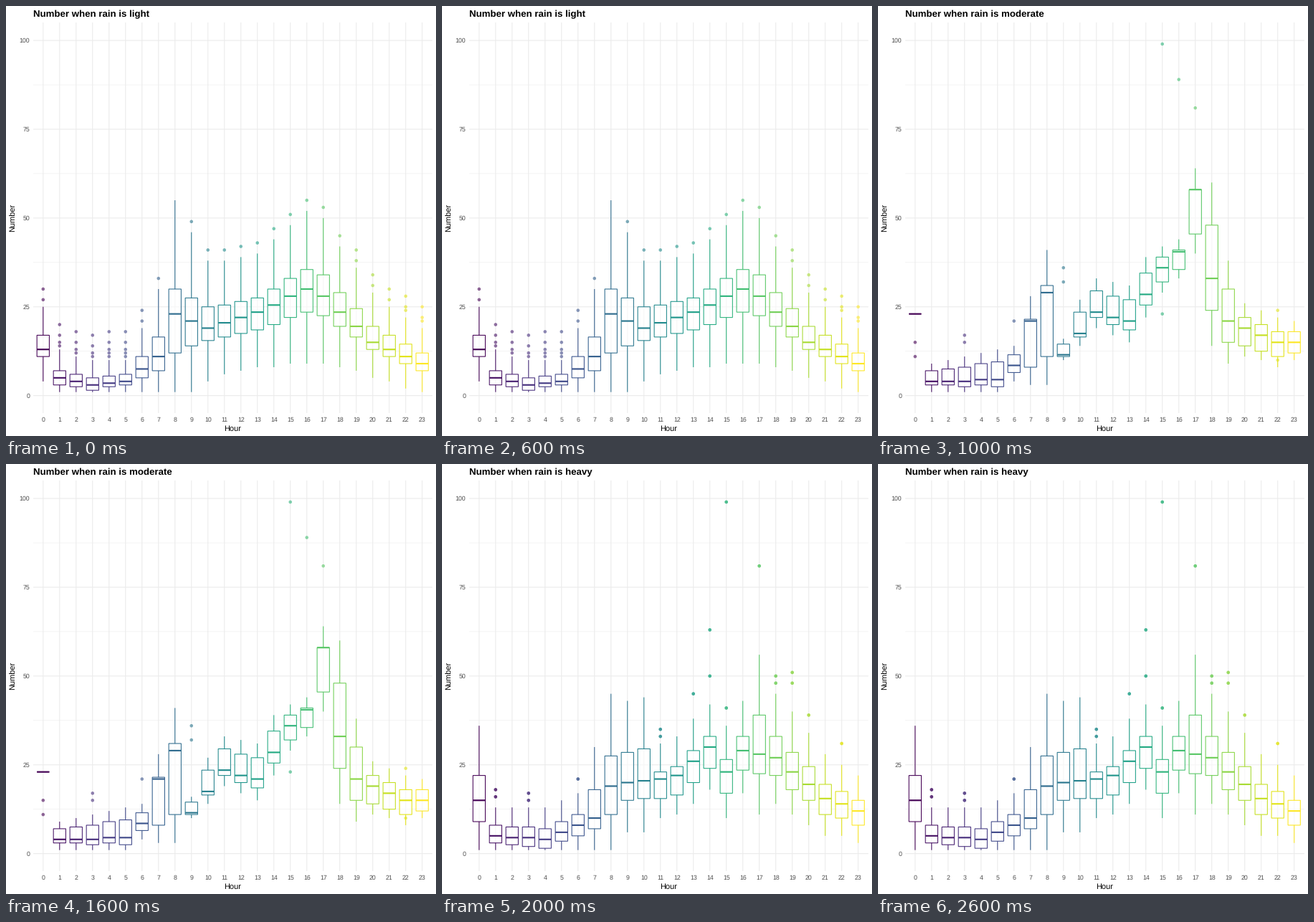
A matplotlib script for the animation above (3 s loop, 600 by 600 pixels).

```python
import matplotlib.pyplot as plt
import numpy as np
from matplotlib.animation import FuncAnimation
from matplotlib.patches import Rectangle

SIZE, DPI = 600, 72          # at 72 dpi one point is one pixel
LEFT, RIGHT, TOP, BOTTOM = 38, 594.5, 23.3, 568.4
HALF = 0.375                 # half a box width, in hours
THIN, LINE, THICK = 0.53, 1.07, 2.13
GRID = "#EBEBEB"
ALPHA = 0.6
HOURS = np.arange(24)

# mid: median by hour; below, above: distance to the quartiles
# reach: whisker lengths down and up, in quartile ranges
# tail: how densely outliers follow the upper whisker
# stray: single outliers, each drawn "copies" times
SCENES = {
    "light": dict(
        mid={0: 13, 1: 5, 3: 3, 5: 4, 7: 11, 8: 23, 10: 19, 13: 23.5,
             16: 30, 17: 28, 20: 15, 23: 9},
        below={0: 2, 5: 1, 7: 4, 8: 11, 10: 3.5, 16: 6.5, 20: 2},
        above={0: 4, 1: 2, 5: 2, 8: 7, 13: 4, 17: 6, 23: 3},
        reach=(1.2, 1.4), tail=17, stray={}, copies=1),
    "moderate": dict(
        mid={0: 23, 1: 4, 5: 4.5, 6: 8.5, 7: 21, 8: 29, 9: 11.5, 11: 23.5,
             13: 21, 15: 36, 16: 40.5, 17: 58, 18: 33, 19: 21, 22: 15},
        below={0: 0, 1: 1, 6: 2, 7: 13, 8: 18, 9: 0.5, 14: 3, 16: 5,
               17: 12.5, 19: 6, 23: 3},
        above={0: 0, 1: 3, 5: 5, 7: 0.5, 9: 3, 10: 6, 14: 6, 16: 0.5,
               17: 0, 18: 15, 20: 3},
        reach=(0.4, 0.5), tail=0, copies=1,
        stray={0: (11, 15), 3: (15, 17), 6: (21,), 9: (32, 36),
               15: (23, 99), 16: (89,), 17: (81,), 22: (10, 24)}),
    "heavy": dict(
        mid={0: 15, 1: 5, 4: 4, 7: 10, 8: 19, 12: 22, 14: 30, 15: 23,
             16: 29, 18: 27, 21: 15.5, 23: 12},
        below={0: 6, 1: 2, 7: 3, 8: 8, 9: 5, 14: 6, 23: 4},
        above={0: 7, 1: 3, 6: 3, 7: 8, 10: 9, 11: 2, 16: 4, 17: 11,
               18: 6, 23: 3},
        reach=(0.7, 1.05), tail=0, copies=2,
        stray={1: (16, 18), 3: (15, 17), 6: (21,), 11: (33, 35), 13: (45,),
               14: (50, 63), 15: (41, 99), 17: (81,), 18: (48, 50),
               19: (48, 51), 20: (39,), 22: (31,)}),
}

plt.rcParams["font.family"] = "Liberation Sans"
plt.rcParams["text.hinting"] = "none"

fig = plt.figure(figsize=(SIZE / DPI, SIZE / DPI), dpi=DPI, facecolor="white")
ax = fig.add_axes([LEFT / SIZE, 1 - BOTTOM / SIZE,
                   (RIGHT - LEFT) / SIZE, (BOTTOM - TOP) / SIZE])
ax.set_xlim(-0.6, 23.6)
ax.set_ylim(-5, 105)
ax.axis("off")
colors = plt.cm.viridis(np.linspace(0, 1, 24))


def curve(points):
    """Values for all hours from a few key points, in steps of one half."""
    values = np.interp(HOURS, list(points), list(points.values()))
    return np.round(values * 2) / 2


def tail_values(high, spread, density):
    """Whole numbers above the whisker, thinning out exponentially."""
    count = int(density / spread) if spread else 0
    share = (np.arange(count) + 0.5) / max(count, 1)
    return list(np.round(high + 1 - 3 * np.log(1 - share)))


def px_x(hour):
    return LEFT + (hour + 0.6) / 24.2 * (RIGHT - LEFT)


def px_y(value):
    return BOTTOM - (value + 5) / 110 * (BOTTOM - TOP)


def label(x, y, text, size, **style):
    """Text with its baseline at a pixel position counted from the top left."""
    style = {"ha": "center", "va": "baseline", "color": "black", **style}
    return fig.text(x / SIZE, 1 - y / SIZE, text, fontsize=size, **style)


def draw_frame():
    for y in np.arange(12.5, 100, 25):
        ax.axhline(y, color=GRID, lw=THIN, zorder=1, snap=False)
    for y in range(0, 101, 25):
        ax.axhline(y, color=GRID, lw=LINE, zorder=1, snap=False)
        label(33.05, px_y(y) + 3.2, str(y), 8.8, ha="right", color="#4D4D4D")
    for hour in HOURS:
        ax.axvline(hour, color=GRID, lw=LINE, zorder=1, snap=False)
        label(px_x(hour), 580, str(hour), 8.8, color="#4D4D4D")
    label((LEFT + RIGHT) / 2, 593, "Hour", 11)
    label(13.3, (TOP + BOTTOM) / 2, "Number", 11,
          rotation=90, rotation_mode="anchor")


def segment(xs, ys, color, width):
    return ax.plot(xs, ys, color=color, lw=width, zorder=3,
                   solid_capstyle="butt", snap=False)[0]


def draw_box(hour, low, q1, mid, q3, high, outliers):
    color = colors[hour]
    box = Rectangle((hour - HALF, q1), 2 * HALF, q3 - q1, lw=LINE,
                    facecolor=(1, 1, 1, ALPHA), edgecolor=color,
                    joinstyle="miter", zorder=3, snap=False)
    # without edges the dots keep their exact sub-pixel places
    dots = ax.scatter([hour] * len(outliers), outliers, s=4.6 ** 2,
                      facecolors=[color], edgecolors="none", alpha=ALPHA,
                      zorder=2)
    return [
        ax.add_patch(box), dots,
        segment([hour, hour], [low, q1], color, LINE),
        segment([hour, hour], [q3, high], color, LINE),
        segment([hour - HALF, hour + HALF], [mid, mid], color, THICK),
    ]


def build(rain, scene):
    group = [label(LEFT, 15, f"Number when rain is {rain}", 13.2,
                   ha="left", weight="bold")]
    mids = curve(scene["mid"])
    q1s = mids - curve(scene["below"])
    q3s = mids + curve(scene["above"])
    down, up = scene["reach"]
    for hour, q1, mid, q3 in zip(HOURS, q1s, mids, q3s):
        spread = q3 - q1
        low = max(1, round(q1 - down * spread))
        high = round(q3 + up * spread)
        outliers = list(scene["stray"].get(hour, ())) * scene["copies"]
        outliers += tail_values(high, spread, scene["tail"])
        group += draw_box(hour, low, q1, mid, q3, high, outliers)
    return group


draw_frame()
groups = [build(rain, scene) for rain, scene in SCENES.items()]


def update(i):
    for k, group in enumerate(groups):
        for artist in group:
            artist.set_visible(k == i)
    return groups[i]


update(0)
anim = FuncAnimation(fig, update, frames=len(groups), interval=1000,
                     repeat=True, repeat_delay=0, blit=False)
plt.show()
```
